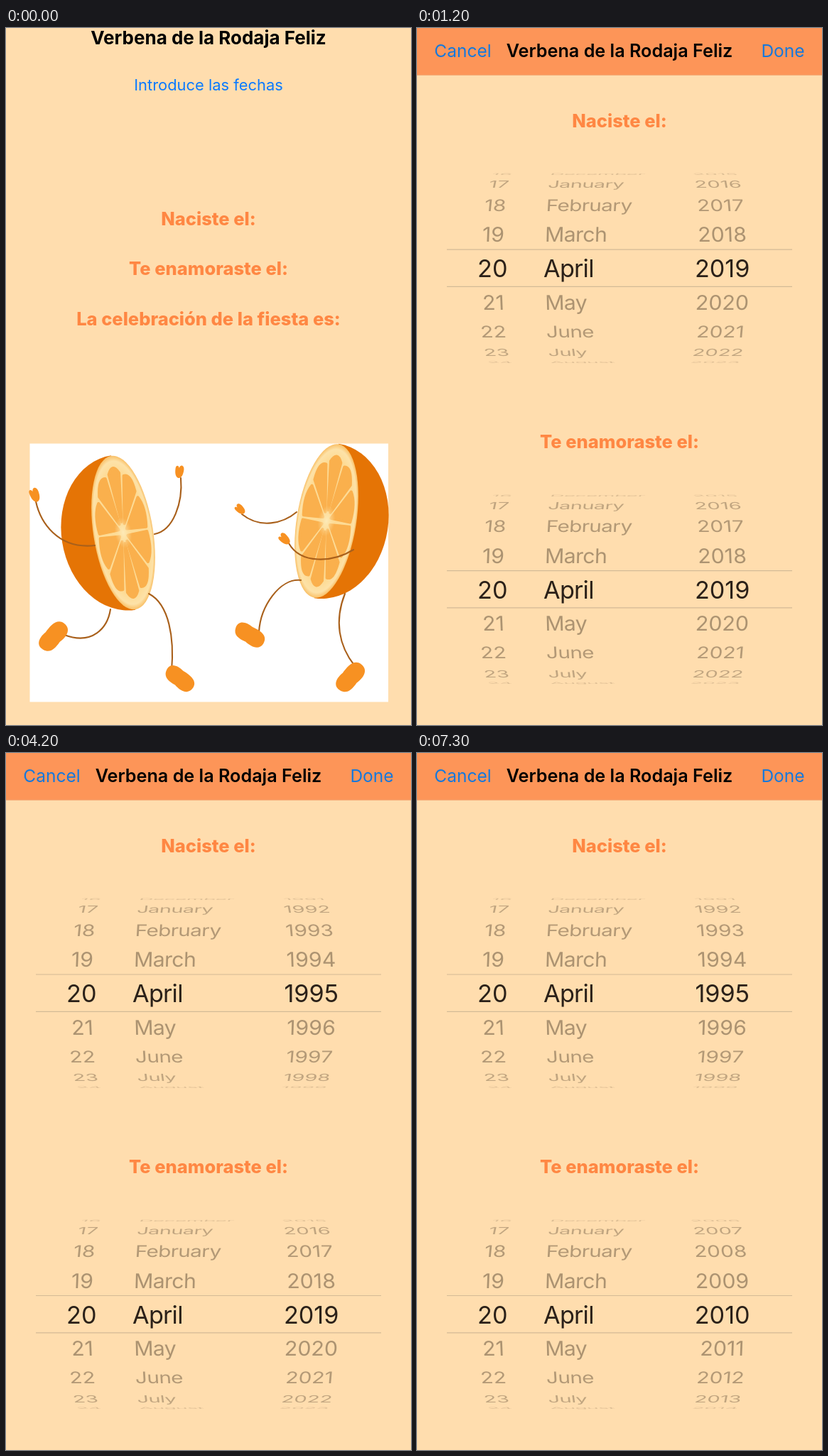
Recreate the animation shown at these times as an HTML page. Size 570 px wide and 982 px high, loop 8 s.

```html
<!DOCTYPE html>
<html lang="es">
<head>
<meta charset="utf-8">
<title>Verbena de la Rodaja Feliz</title>
<style>
  html, body { margin: 0; width: 100%; height: 100%; overflow: hidden; background: #ffddae; }
  svg { display: block; width: 100%; height: 100%; }
  text { font-family: Inter, Roboto, sans-serif; text-anchor: middle; }
  .title { font-size: 26px; font-weight: 700; }
  .heading { font-size: 25.5px; font-weight: 800; fill: #ff8743; }
  .bar-title { font-size: 25.2px; font-weight: 600; }
  .link { font-size: 21.9px; fill: #0a7aff; }
  .bar-link { font-size: 24.5px; fill: #1678dc; }
  .rule { stroke: #d3ba96; stroke-width: 1.2; }
  .limb path { fill: none; stroke: #a9601b; stroke-width: 2.1; stroke-linecap: round; }
  .skin { fill: #f79122; }
  .outer text { font-size: 30.5px; fill: #1c1208; }
  .lens text { font-size: 34.2px; fill: #2b2119; }
</style>
</head>
<body>
<svg viewBox="0 0 570 982" preserveAspectRatio="none">
  <defs>
    <clipPath id="outerClip"><path d="M-285-135H285V-26.5H-285ZM-285 26H285V134H-285Z"/></clipPath>
    <clipPath id="lensClip"><path d="M-285-26.5H285V26H-285Z"/></clipPath>
    <radialGradient id="rind">
      <stop offset=".8" stop-color="#fddb95"/>
      <stop offset=".93" stop-color="#fde2a8"/>
      <stop offset="1" stop-color="#f9c067"/>
    </radialGradient>
    <radialGradient id="core">
      <stop offset="0" stop-color="#fdeab8"/>
      <stop offset="1" stop-color="#fddf9f" stop-opacity="0"/>
    </radialGradient>
    <path id="foot" d="M-23-2C-24-15-11-16-1-13C11-13 26-11 24 3C22 16 7 14-1 11C-13 11-22 9-23-2Z"/>
    <path id="hand" d="M-6-4C-6-9-2-9-1-5C0-11 6-10 6-3C6 4 4 10-1 9C-5 7-6 2-6-4Z"/>
    <g id="half" transform="rotate(-9)">
      <path d="M0-110A87 110 0 0 0 0 110Z" fill="#e57405"/>
      <ellipse rx="42" ry="109.5" fill="url(#rind)"/>
      <g id="wedges" fill="#fab04d" stroke="#fab04d" stroke-width="4" stroke-linejoin="round"/>
      <ellipse rx="12" ry="22" fill="url(#core)"/>
    </g>
  </defs>

  <rect width="570" height="982" fill="#ffddae"/>
  <text class="title" x="285" y="23">Verbena de la Rodaja Feliz</text>
  <text class="link" id="open" x="285" y="87.5">Introduce las fechas</text>
  <text class="heading" x="285" y="277.5">Naciste el:</text>
  <text class="heading" x="285" y="348">Te enamoraste el:</text>
  <text class="heading" x="285" y="419">La celebración de la fiesta es:</text>

  <rect x="33.5" y="585.5" width="504.5" height="364" fill="#fff"/>
  <use href="#half" x="165" y="711"/>
  <use href="#half" transform="translate(451 694.5) scale(-1 1)"/>
  <g class="limb">
    <path d="M42 667C48 695 72 735 125 729"/>
    <path d="M209 713C236 708 249 668 246 634"/>
    <path d="M147 819C143 845 122 870 82 855"/>
    <path d="M201 797C230 812 237 860 233 906"/>
    <path d="M409 682C390 698 358 706 332 685"/>
    <path d="M489 735C460 753 415 756 398 726"/>
    <path d="M415 778C385 775 358 815 356 851"/>
    <path d="M477 797C462 835 468 870 491 899"/>
  </g>
  <g class="skin">
    <use href="#foot" transform="translate(67 858) rotate(-55)"/>
    <use href="#foot" transform="translate(244 917) rotate(30) scale(.95)"/>
    <use href="#foot" transform="translate(342.5 855.5) rotate(24) scale(.95)"/>
    <use href="#foot" transform="translate(485 915.5) rotate(-55)"/>
    <use href="#hand" transform="translate(40.5 658) rotate(-20) scale(1.1)"/>
    <use href="#hand" transform="translate(244 625) rotate(8)"/>
    <use href="#hand" transform="translate(329.5 678) rotate(-45) scale(.9)"/>
    <use href="#hand" transform="translate(392 720) rotate(-45)"/>
  </g>

  <g id="sheet">
    <rect y="-2" width="570" height="1100" fill="#ffddae"/>
    <rect y="-2" width="570" height="68" fill="#fd9558"/>
    <path d="M0 66.2H570" stroke="#f2a06a"/>
    <text class="bar-link" x="64.5" y="41">Cancel</text>
    <text class="bar-title" x="285" y="41">Verbena de la Rodaja Feliz</text>
    <text class="bar-link" x="515" y="41">Done</text>
    <text class="heading" x="285" y="140">Naciste el:</text>
    <text class="heading" x="285" y="592.3">Te enamoraste el:</text>
  </g>
</svg>
<script>
const LOOP = 8000, STEP = 100;
const ROW_ANGLE = 21 * Math.PI / 180, RADIUS = 133, DEPTH = 1500, REACH = 4;
const MONTHS = ['January', 'February', 'March', 'April', 'May', 'June', 'July',
  'August', 'September', 'October', 'November', 'December'];
const sheet = document.getElementById('sheet');
const openLink = document.getElementById('open');

function add(parent, tag, attrs = {}) {
  const node = document.createElementNS('http://www.w3.org/2000/svg', tag);
  for (const name in attrs) node.setAttribute(name, attrs[name]);
  return parent.appendChild(node);
}

// Wedges of an ellipse, inset so that the pale lines between them have an even width.
function drawWedges(count, rx = 42, ry = 109, inset = 3.2) {
  const group = document.getElementById('wedges');
  const slice = 2 * Math.PI / count, rim = .79;
  const at = (r, a) => `${(rx * r * Math.cos(a)).toFixed(1)} ${(ry * r * Math.sin(a)).toFixed(1)}`;
  const gap = a => inset * Math.hypot(rx * Math.cos(a), ry * Math.sin(a)) / (rx * ry * rim);
  for (let i = 0; i < count; i++) {
    const from = i * slice, to = from + slice, mid = from + slice / 2;
    add(group, 'path', {
      d: `M${at(.14, mid)}L${at(rim, from + gap(from))}Q${at(.92, mid)} ${at(rim, to - gap(to))}Z`
    });
  }
}

// A wheel is a cylinder seen in slight perspective, with a flat magnified row in front.
function makeWheel(picker, { x, lensX, anchor, label, tracking = 0 }) {
  const makeRows = layer => Array.from({ length: 2 * REACH + 2 }, () =>
    add(layer, 'text', { style: `text-anchor:${anchor};letter-spacing:${tracking}px` }));
  const outer = makeRows(picker.outer), lens = makeRows(picker.lens);
  return position => {
    const first = Math.floor(position) - REACH;
    outer.forEach((row, i) => {
      const angle = (first + i - position) * ROW_ANGLE;
      const sin = Math.sin(angle), cos = Math.cos(angle);
      const hidden = Math.abs(angle) >= Math.PI / 2;
      const scale = DEPTH / (DEPTH + RADIUS * (1 - cos));
      row.style.display = hidden ? 'none' : '';
      lens[i].style.display = Math.abs(angle) > 1.2 * ROW_ANGLE ? 'none' : '';
      if (hidden) return;
      row.textContent = lens[i].textContent = label(first + i);
      row.setAttribute('y', 11.1);
      row.setAttribute('opacity', .37 * cos ** .4);
      row.setAttribute('transform',
        `matrix(${scale} 0 ${-x * sin / DEPTH} ${cos} ${x * scale} ${RADIUS * sin})`);
      lens[i].setAttribute('x', lensX);
      lens[i].setAttribute('y', RADIUS * sin + 12.8);
    });
  };
}

function makePicker(y) {
  const group = add(sheet, 'g', { transform: `translate(285 ${y})` });
  const picker = {
    outer: add(group, 'g', { class: 'outer', 'clip-path': 'url(#outerClip)' }),
    lens: add(group, 'g', { class: 'lens', 'clip-path': 'url(#lensClip)' })
  };
  add(group, 'path', { class: 'rule', d: 'M-243-26.5H243M-243 25.8H243' });
  makeWheel(picker, { x: -163, lensX: -157.5, anchor: 'end', label: String })(20);
  makeWheel(picker, {
    x: -105.5, lensX: -107, anchor: 'start', tracking: -.7, label: n => MONTHS[(n + 12) % 12]
  })(3);
  return makeWheel(picker, { x: 145.3, lensX: 144.7, anchor: 'middle', label: String });
}

const progress = (t, from, to) => Math.min(1, Math.max(0, (t - from) / (to - from)));
const easeOut = (u, power) => 1 - (1 - u) ** power;

function birthYear(t) {
  const flick = easeOut(progress(t, 2450, 3400), 2);
  const settle = easeOut(progress(t, 3400, 4200), 2);
  return 2019 - 24.31 * flick + .31 * settle;
}

const loveYear = t => 2019 - 9 * easeOut(progress(t, 5352, 7300), 2.587);

function sheetOffset(t) {
  const s = Math.max(0, t - 507) / 1000 * 18.26;
  return 984 * (1 + s) * Math.exp(-s);
}

function linkOpacity(t) {
  return t < 100 ? 1 : .25 + .75 * progress(t, 400, 800);
}

drawWedges(10);
const setBirth = makePicker(338.5), setLove = makePicker(791);

function draw() {
  const t = Math.floor(performance.now() % LOOP / STEP) * STEP;
  sheet.setAttribute('transform', `translate(0 ${sheetOffset(t).toFixed(2)})`);
  openLink.setAttribute('opacity', linkOpacity(t));
  setBirth(birthYear(t));
  setLove(loveYear(t));
  requestAnimationFrame(draw);
}
draw();
</script>
</body>
</html>
```
